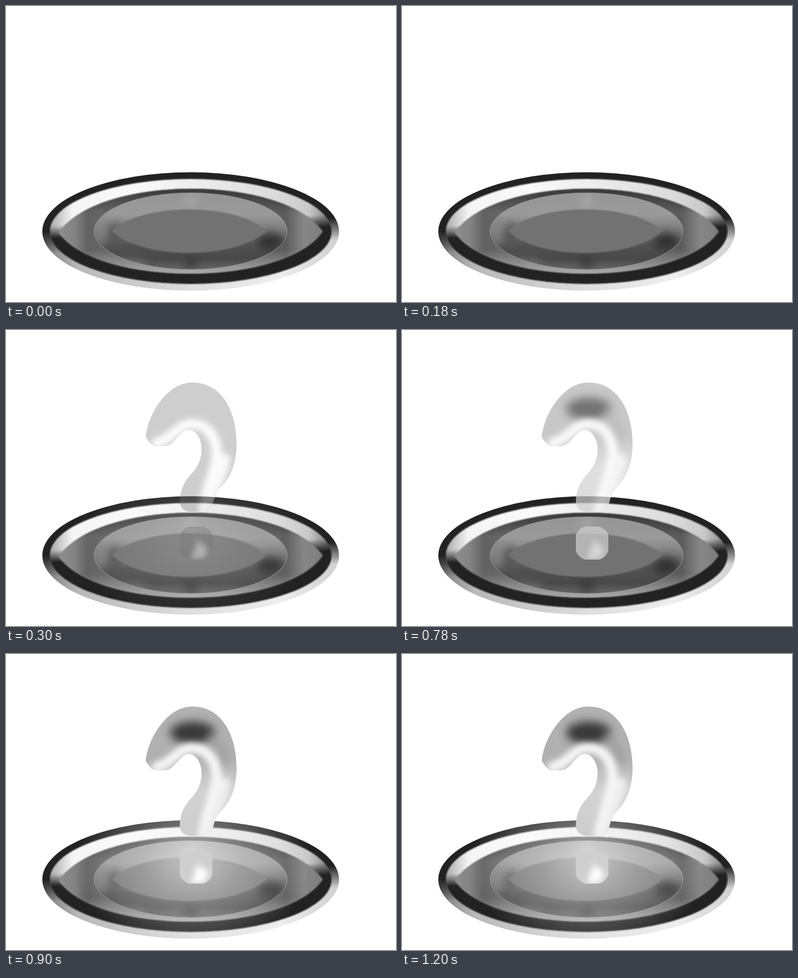
An HTML page that plays this animation: 756x575 px, repeating every 1.4 s.

```html
<!DOCTYPE html>
<html lang="en">
<head>
<meta charset="utf-8">
<title>Question on a plate</title>
<style>
  html, body { margin: 0; width: 100%; height: 100%; overflow: hidden; background: #fff; }
  svg { display: block; width: 756px; height: 575px; }
</style>
</head>
<body>
<svg viewBox="0 0 756 575">
  <defs>
    <linearGradient id="rimLight">
      <stop offset="0" stop-color="#777"/><stop offset=".12" stop-color="#b8b8b8"/>
      <stop offset=".5" stop-color="#dedede"/><stop offset=".8" stop-color="#eee"/>
      <stop offset="1" stop-color="#d0d0d0"/>
    </linearGradient>
    <linearGradient id="rimDark" gradientUnits="userSpaceOnUse" x1="358" y1="425" x2="360" y2="468">
      <stop offset="0" stop-color="#222"/><stop offset="1" stop-color="#222" stop-opacity="0"/>
    </linearGradient>
    <linearGradient id="wallLight">
      <stop offset="0" stop-color="#aaa"/><stop offset=".08" stop-color="#f4f4f4"/>
      <stop offset=".3" stop-color="#fafafa"/><stop offset=".5" stop-color="#eee"/>
      <stop offset=".8" stop-color="#dcdcdc"/><stop offset=".92" stop-color="#c8c8c8"/>
      <stop offset="1" stop-color="#777"/>
    </linearGradient>
    <linearGradient id="wallDark" gradientUnits="userSpaceOnUse" x1="358" y1="416" x2="359" y2="440">
      <stop offset="0" stop-color="#222" stop-opacity="0"/><stop offset="1" stop-color="#222"/>
    </linearGradient>
    <linearGradient id="basin" gradientUnits="userSpaceOnUse" x1="102" x2="614">
      <stop offset="0" stop-color="#8e8e8e"/><stop offset=".06" stop-color="#838383"/>
      <stop offset=".11" stop-color="#626262"/><stop offset=".2" stop-color="#686868"/>
      <stop offset=".5" stop-color="#707070"/><stop offset=".86" stop-color="#5c5c5c"/>
      <stop offset=".93" stop-color="#878787"/><stop offset="1" stop-color="#7c7c7c"/>
    </linearGradient>
    <linearGradient id="basinShade" gradientUnits="userSpaceOnUse" x1="0" x2="0" y1="355" y2="520">
      <stop offset="0" stop-color="#111" stop-opacity=".6"/><stop offset=".28" stop-color="#111" stop-opacity="0"/>
      <stop offset=".72" stop-color="#ccc" stop-opacity="0"/><stop offset="1" stop-color="#ccc" stop-opacity=".65"/>
    </linearGradient>
    <linearGradient id="dish" x2="0" y2="1">
      <stop offset="0" stop-color="#959595"/><stop offset=".28" stop-color="#9a9a9a"/>
      <stop offset=".5" stop-color="#7a7a7a"/><stop offset=".68" stop-color="#525252"/>
      <stop offset=".86" stop-color="#484848"/><stop offset="1" stop-color="#666"/>
    </linearGradient>
    <radialGradient id="glowFill">
      <stop offset="0" stop-color="#fff" stop-opacity=".6"/>
      <stop offset=".4" stop-color="#fff" stop-opacity=".32"/>
      <stop offset="1" stop-color="#fff" stop-opacity="0"/>
    </radialGradient>
    <linearGradient id="hook" gradientUnits="userSpaceOnUse" x1="0" x2="0" y1="102" y2="353">
      <stop offset="0" stop-color="#b2b2b2"/><stop offset=".4" stop-color="#b0b0b0"/>
      <stop offset=".65" stop-color="#d2d2d2"/><stop offset="1" stop-color="#cdcdcd"/>
    </linearGradient>
    <filter id="blur2" x="-20%" y="-20%" width="140%" height="140%"><feGaussianBlur stdDeviation="1"/></filter>
    <filter id="blur6" x="-50%" y="-50%" width="200%" height="200%"><feGaussianBlur stdDeviation="6"/></filter>
    <filter id="blur9" x="-80%" y="-80%" width="260%" height="260%"><feGaussianBlur stdDeviation="9"/></filter>
    <clipPath id="dishClip"><ellipse cx="358" cy="437.5" rx="187" ry="74.5"/></clipPath>
    <clipPath id="markClip">
      <path d="M271 208C274 168 310 102 361 102C420 102 447 160 447 222C447 262 433 290 415 307C405 318 404 328 401 338Q396 353 380 353H358Q340 352 337 336C337 316 342 298 358 281C372 266 380 250 379 228C378 208 366 194 354 194C342 195 335 208 323 219Q316 226 306 226H290Q281 225 271 208Z"/>
      <path id="dotShape" d="M354 382H383Q394 386 400 397V429Q396 441 383 446H354Q342 441 337 430V398Q342 386 354 382Z"/>
    </clipPath>
  </defs>

  <!-- plate -->
  <g fill="url(#rimLight)">
    <ellipse cx="358" cy="438" rx="287.5" ry="115"/>
    <ellipse cx="358" cy="438" rx="287.5" ry="115" fill="url(#rimDark)"/>
  </g>
  <g filter="url(#blur2)">
    <ellipse cx="358" cy="438" rx="273" ry="102" fill="url(#wallLight)"/>
    <ellipse cx="358" cy="438" rx="273" ry="102" fill="url(#wallDark)"/>
  </g>
  <g filter="url(#blur2)">
    <path id="lens" d="M102 440C180 327 536 327 614 438C541 547 175 547 102 440Z" fill="url(#basin)"/>
    <use href="#lens" style="fill:url(#basinShade)"/>
    <path d="M102 440C180 327 536 327 614 438C541 547 175 547 102 440Z" fill="url(#basinShade)"/>
  </g>
  <g clip-path="url(#dishClip)">
    <ellipse cx="358" cy="437.5" rx="187" ry="74.5" fill="url(#dish)"/>
    <g filter="url(#blur9)">
      <ellipse cx="512" cy="458" rx="26" ry="17" fill="#333"/>
      <ellipse cx="211" cy="443" rx="14" ry="22" fill="#555"/>
      <ellipse cx="182" cy="437" rx="8" ry="32" fill="#858585"/>
      <ellipse cx="235" cy="503" rx="40" ry="10" fill="#757575"/>
      <rect x="345" y="364" width="26" height="30" fill="#a3a3a3"/>
      <rect x="345" y="484" width="26" height="24" fill="#3c3c3c"/>
    </g>
    <path d="M205 437C265 381 445 381 505 437C445 494 265 494 205 437Z" fill="#727272" filter="url(#blur2)"/>
  </g>
  <ellipse cx="358" cy="437.5" rx="187" ry="74.5" fill="none" stroke="#a0a0a0" stroke-width=".9"/>

  <ellipse id="glow" cx="363" cy="400" rx="225" ry="190" fill="url(#glowFill)"/>

  <!-- question mark -->
  <g id="mark" clip-path="url(#markClip)">
    <rect x="260" y="95" width="200" height="270" fill="url(#hook)"/>
    <rect x="330" y="378" width="80" height="75" fill="#cfcfcf"/>
    <rect id="veil" x="260" y="95" width="200" height="360" fill="#747474"/>
    <g id="shadow" filter="url(#blur9)">
      <ellipse cx="362" cy="153" rx="44" ry="22" fill="#383838"/>
      <path d="M395 160Q425 185 424 215" fill="none" stroke="#999" stroke-width="12"/>
    </g>
    <g filter="url(#blur6)" fill="none" stroke="#f6f6f6" stroke-linecap="round">
      <path d="M292 220C330 207 333 182 362 183C393 184 410 212 408 245C404 282 388 305 382 352" stroke-width="20"/>
      <path d="M425 250C420 285 404 305 392 345" stroke-width="20" stroke="#efefef"/>
      <path d="M372 408L392 425L384 444L358 446Z" fill="#fff" stroke="none"/>
    </g>
  </g>
</svg>
<script>
  const el = id => document.getElementById(id);
  const steps = [
    { until: 300, mark: 0, glow: 0, veil: 0, shadow: 0 },
    { until: 600, mark: .35, glow: .3, veil: 1, shadow: 0 },
    { until: 900, mark: .7, glow: 0, veil: 0, shadow: 1 },
    { until: 1400, mark: 1, glow: 1, veil: 0, shadow: 1 }
  ];
  const start = performance.now();

  function draw(now) {
    const t = Math.max(0, now - start) % 1400;
    const step = steps.find(s => t < s.until);
    for (const id of ['mark', 'glow', 'veil', 'shadow']) el(id).style.opacity = step[id];
    requestAnimationFrame(draw);
  }
  draw(start);
</script>
</body>
</html>
```
